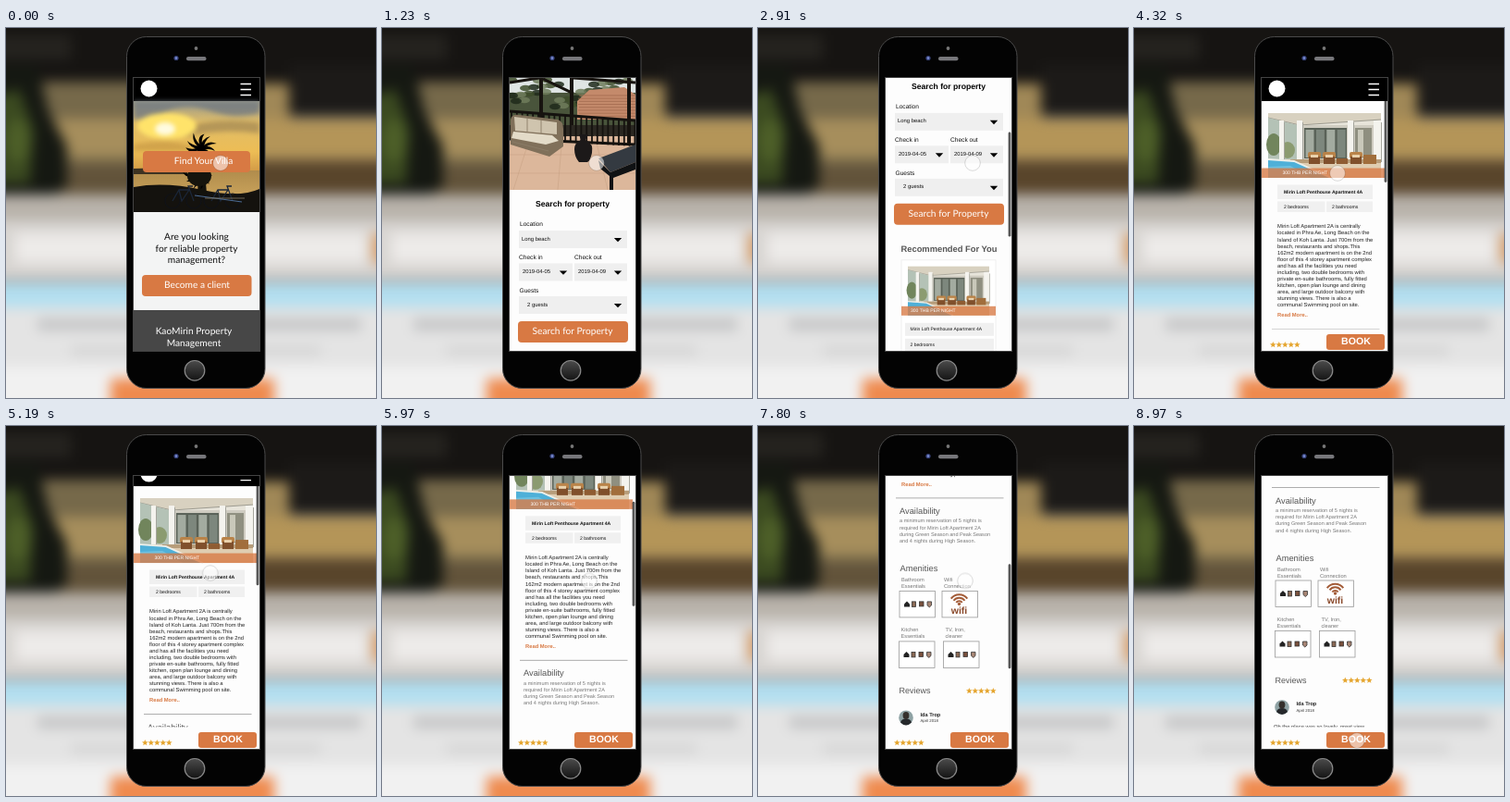
Write an HTML page that moves like this. It is 400x400 px and loops after 9000 ms.

```html
<!DOCTYPE html>
<html lang="en">
<head>
<meta charset="utf-8">
<title>Villa booking on a phone</title>
<style>
  @property --y { syntax: "<number>"; inherits: true; initial-value: 0; }

  html, body { margin: 0; width: 100%; height: 100%; overflow: hidden; background: #222; }
  svg { display: block; width: 100vw; height: 100vh; }
  text { font-family: "Liberation Sans", Arial, sans-serif; text-rendering: geometricPrecision; white-space: pre; }
  filter { color-interpolation-filters: sRGB; }
  .lato { font-family: Lato, sans-serif; }
  .b { font-weight: 700; }
  .mid { text-anchor: middle; }

  .home, .search, .villa, .bar, .touch { animation: 9s linear infinite; }
  .home { animation-name: home; animation-timing-function: step-end; }
  .search { animation-name: search, searchScroll; animation-timing-function: step-end, linear; }
  .villa { animation-name: villa, villaScroll; animation-timing-function: step-end, linear; }
  .page { transform: translateY(calc(var(--y) * -1px)); }
  .thumb { transform: translateY(calc(var(--y) * .385px)); }
  .search .bar { animation-name: searchBar; }
  .villa .bar { animation-name: villaBar; }
  .touch { animation-name: touch; }

  @keyframes home { 0% { visibility: visible } 5.56%, 100% { visibility: hidden } }
  @keyframes search { 0% { visibility: hidden } 5.56% { visibility: visible } 43.33%, 100% { visibility: hidden } }
  @keyframes villa { 0% { visibility: hidden } 43.33%, 100% { visibility: visible } }

  @keyframes searchScroll {
    0%, 10.7% { --y: 0 }
    13.67% { --y: 25 }
    32.33% { --y: 152 }
    40.2%, 100% { --y: 255 }
  }
  @keyframes villaScroll {
    0%, 55.6% { --y: 0 }
    66.33% { --y: 72 }
    77.33% { --y: 182 }
    88.3%, 100% { --y: 259 }
  }
  @keyframes searchBar { 0%, 14% { opacity: 0 } 16%, 41% { opacity: 1 } 43%, 100% { opacity: 0 } }
  @keyframes villaBar { 0%, 90% { opacity: 1 } 93%, 100% { opacity: 0 } }
  @keyframes touch {
    0%, 34% { transform: translate(232px, 146px) }
    41%, 55.6% { transform: translate(220px, 157px) }
    66.33%, 88% { transform: translate(224px, 167.5px) }
    95%, 100% { transform: translate(241px, 340px) }
  }
</style>
</head>
<body>
<svg id="stage" viewBox="0 0 400 400" preserveAspectRatio="none"></svg>
<script>
const ORANGE = '#d87943', GOLD = '#e5a52e';

const rect = (x, y, w, h, fill, more = '') =>
  `<rect x="${x}" y="${y}" width="${w}" height="${h}" fill="${fill}" ${more}/>`;
const oval = (x, y, rx, ry, fill, more = '') =>
  `<ellipse cx="${x}" cy="${y}" rx="${rx}" ry="${ry}" fill="${fill}" ${more}/>`;
const path = (d, fill, more = '') => `<path d="${d}" fill="${fill}" ${more}/>`;
const line = (d, stroke, width = 1) => path(d, 'none', `stroke="${stroke}" stroke-width="${width}"`);
const text = (x, y, size, str, fill = '#111', cls = '') =>
  `<text x="${x}" y="${y}" font-size="${size}" fill="${fill}" class="${cls}">${str}</text>`;
const lines = (x, y, size, gap, rows, fill, cls) =>
  rows.map((row, i) => text(x, y + i * gap, size, row, fill, cls)).join('');
const group = (cls, body) => `<g class="${cls}">${body}</g>`;
const at = (x, y, body, scale = '1') => `<g transform="translate(${x} ${y}) scale(${scale})">${body}</g>`;
const times = (n, fn) => Array.from({ length: n }, (_, i) => fn(i)).join('');
const gradient = (id, stops) => `<linearGradient id="${id}" x2="0" y2="1">` +
  stops.map(([at, color]) => `<stop offset="${at}" stop-color="${color}"/>`).join('') + '</linearGradient>';

function stars(x, y) {
  const points = Array.from({ length: 10 }, (_, i) => {
    const a = i * Math.PI / 5, r = i % 2 ? 1.5 : 3.5;
    return `${(r * Math.sin(a)).toFixed(2)},${(-r * Math.cos(a)).toFixed(2)}`;
  }).join(' ');
  return times(5, i => at(x + i * 6.5, y, `<polygon points="${points}" fill="${GOLD}"/>`));
}

const header = rect(138, 54, 136, 25, '#000') +
  oval(154.5, 65.5, 9, 9, '#fff') +
  line('M253.5 60.5H265M253.5 66.5H265M253.5 72.5H265', '#fff', 1.3);

const button = (x, y, w, label, cx) =>
  rect(x, y, w, 23, ORANGE, 'rx="4"') + text(cx, y + 14.4, 10.2, label, '#fff', 'lato mid');

const arrow = (x, y) => path(`M${x - 4.2} ${y}h8.4l-4.2 4.4z`, '#000');

const field = (x, y, w, value, dx = 3) =>
  rect(x, y, w, 19, '#efefef') + text(x + dx, y + 10.6, 5.9, value) + arrow(x + w - 10, y + 8);

const bar = group('bar', group('thumb', rect(270.6, 54, 2.8, 113, '#000', 'rx="1.4" opacity=".65"')));

function backdrop() {
  const soft = [
    rect(-30, -30, 460, 95, '#161412'),
    rect(-30, 8, 100, 26, '#25231f'),
    rect(-30, 58, 200, 125, '#76694a'),
    rect(40, 98, 100, 42, '#a68e5c'),
    rect(40, 148, 110, 32, '#62533a'),
    path('M-30 40H34L46 90L66 128V172L40 186H-30z', '#151812'),
    path('M-30 80L14 66L30 110L26 168H-30z', '#3b4a20'),
    oval(13, 122, 13, 24, '#4d5f28'),
    rect(260, 60, 48, 50, '#a08857'),
    rect(306, 40, 130, 55, '#1c1a18'),
    rect(260, 98, 170, 44, '#b49558'),
    rect(260, 143, 170, 36, '#59452b'),
    rect(-30, 180, 460, 32, '#b8b2aa'),
    rect(-30, 208, 460, 64, '#d8d5d2'),
    rect(10, 222, 380, 32, '#edebe9'),
    rect(396, 222, 30, 32, '#d9a06d'),
    rect(-30, 275, 460, 27, '#b3dff0'),
    rect(-30, 302, 460, 130, '#e4e4e4'),
    rect(34, 314, 350, 13, '#c4c5c6'),
    rect(70, 344, 270, 10, '#d4d4d4'),
    rect(-30, 366, 460, 66, '#f1f1f1'),
    rect(113, 379, 177, 50, '#ef8a4e')
  ].join('');
  return rect(0, 0, 400, 400, '#777') + `<g filter="url(#blur)">${soft}</g>`;
}

function sunset() {
  const frond = i => `<path d="M0 0Q${9 + i % 3 * 2} -5 ${15 + i % 4} ${3 + i % 3}Q8 -1 0 3z" transform="rotate(${i * 33})"/>`;
  const bike = x => [x, x + 23].map(cx => `<circle cx="${cx}" cy="187" r="8" fill="none" stroke="#101218" stroke-width="1.2"/>`).join('') +
    line(`M${x} 187L${x + 7} 175H${x + 18}L${x + 10} 187L${x + 7} 175M${x + 23} 187L${x + 17} 171H${x + 22}`, '#1b2638', 1.3);
  return rect(138, 79, 136, 78, 'url(#sky)') +
    `<g filter="url(#haze)">` +
    path('M138 79H274V92Q248 99 222 90T176 89T138 99z', '#6f7780', 'opacity=".75"') +
    path('M192 108Q224 96 274 102V114Q230 108 194 118z', '#a18653', 'opacity=".7"') +
    path('M138 126Q176 118 200 128V133H138z', '#b78a3f', 'opacity=".5"') +
    oval(174, 106, 32, 14, '#ffe36a') + oval(172, 109, 11, 7, '#fffbe0') + '</g>' +
    rect(138, 154, 136, 28, 'url(#sea)') +
    path('M138 152L172 151L196 154V158H138z', '#3d3322') +
    path('M138 172Q172 166 212 175T274 174V199H138z', '#14120e') +
    path('M207 180L209 140H214L217 180z', '#13120c') +
    at(211, 130, times(11, frond)) + at(208, 157, times(11, frond)) + oval(209, 160, 13, 11, '#15140d') +
    bike(180) + bike(222) +
    line('M204 181L255 188', '#4b6a92', 1.1) + line('M215 184H258', '#867b69', .8);
}

function terrace() {
  const leaf = i => oval(140 + i * 37 % 134, 81 + i * 13 % 30, 6, 3.2, ['#3e4d2c', '#6f7c5c', '#1f2a1b'][i % 3], 'opacity=".85"');
  return rect(138, 79, 136, 121, '#dfe5e4') + rect(138, 95, 136, 38, '#49543b') + times(38, leaf) +
    path('M211 104L224 92L262 89L274 97V124H211z', '#c48a6b') +
    times(8, i => line(`M${213 - i % 2} ${98 + i * 3.2}H274`, '#9c654a', .7)) +
    rect(138, 130, 136, 16, '#2b2822') +
    path('M138 147L200 142H274V200H138z', '#dcb79b') +
    line('M138 162H274M138 182H274M160 143L142 200M195 141L190 200M230 141L244 200', '#c59e80', .5) +
    line('M138 115L274 125M138 145L274 151', '#15120f', 3) +
    times(24, i => line(`M${140 + i * 5.8} ${116 + i * .35}v29`, '#15120f', 1.8)) +
    line('M172 79V126M205 79V130M267 79V150', '#17130f', 4) +
    line('M138 84L170 79M174 80L207 96M207 79L274 84', '#17130f', 3) +
    path('M139 124Q140 118 148 119L190 124Q196 126 196 134V153L181 164L139 151z', '#80705a') +
    path('M143 121L189 127V140L144 136z', '#cfc4ae') +
    path('M142 137L184 141L191 147L177 151L140 144z', '#e3dbc8') +
    line('M157 123V137M172 125V139M141 148L180 158', '#8c7d68', .9) +
    path('M213 140H223L220 146Q229 150 227 160Q225 169 222 170H213Q208 164 208 156Q208 149 215 146z', '#1c1919') +
    path('M234 166L274 151V170L247 181z', '#343a41') +
    path('M234 168L247 181L274 170V178L250 187V200H246V185L236 177z', '#101214');
}

// Drawn in a 122 by 70 box.
function house() {
  const chair = x => rect(x, 42, 14, 7, '#b98349', 'rx="2"') + rect(x + 1, 47, 12, 8, '#80502c') + rect(x + 3, 45, 8, 3, '#ead2ad');
  const pillar = (x, w) => rect(x, 8, w, 46, '#f4f3ee') + rect(x + w, 10, 1, 43, '#a5a59d');
  return rect(0, 0, 122, 70, '#e7e4da') +
    path('M0 0H122V7L34 13L0 5z', '#d8d1c0') + line('M0 5L34 13L122 7', '#8c8b80', .8) +
    path('M0 5L32 13V50H0z', '#b4c2b6') + oval(6, 34, 8, 12, '#71855c') + oval(21, 40, 8, 9, '#8b9b70') +
    rect(32, 13, 90, 38, '#cfccc1') + rect(39, 16, 46, 33, '#596157') +
    times(4, i => rect(40.5 + i * 11.4, 18, 9, 30, i % 2 ? '#7d877d' : '#a3aba0')) +
    rect(94, 16, 18, 32, '#8f8f80') + rect(97, 18, 6, 29, '#c9c8ba') +
    pillar(12, 5) + pillar(31, 6) + pillar(86, 6) + pillar(114, 8) +
    path('M0 50H122V70H0z', '#dfcdb1') + rect(24, 50, 98, 4, '#b79d7a') +
    path('M0 50L28 52L68 70H0z', '#4fb0d8') + path('M0 58L24 57L46 70H0z', '#84cde6', 'opacity=".6"') +
    line('M0 50L28 52L68 70', '#eef1ec', 1.8) +
    chair(43) + chair(59) + chair(88) + rect(74, 49, 12, 6, '#8f5c32') + rect(103, 45, 14, 10, '#a16e3c');
}

function homePage() {
  return rect(138, 54, 136, 295, '#f3f4f4') + header + sunset() +
    button(148, 133, 116, 'Find Your Villa', 213.5) +
    lines(206, 228.8, 10.2, 12.8, ['Are you looking', 'for reliable property', 'management?'], '#111', 'lato mid') +
    button(147, 267, 118.5, 'Become a client', 206.5) +
    rect(138, 305, 136, 44, '#474747') +
    lines(203, 330.8, 10.2, 12.8, ['KaoMirin Property', 'Management'], '#fff', 'lato mid');
}

function searchPage() {
  return header + terrace() +
    text(206, 218, 8.62, 'Search for property', '#000', 'b mid') +
    text(149, 239.5, 6.6, 'Location') + field(148, 244, 117, 'Long beach') +
    text(148, 275.3, 6.6, 'Check in') + text(208, 275.3, 6.6, 'Check out') +
    field(148, 279.5, 58, '2019-04-05', 4) + field(208, 279.5, 57, '2019-04-09', 4) +
    text(148.5, 310.8, 6.6, 'Guests') + field(148, 315, 117, '2 guests', 9) +
    button(147, 342, 119, 'Search for Property', 206) +
    text(206.5, 394, 9.36, 'Recommended For You', '#555', 'b mid') +
    rect(155, 403, 102, 122, '#fff', 'stroke="#f0f0f0"') +
    at(162, 410, house(), '.721 .757') +
    rect(155, 453, 102, 10, ORANGE, 'opacity=".78"') + text(165, 459.5, 5.05, '300 THB PER NIGHT', '#fff') +
    ['Mirin Loft Penthouse Apartment 4A', '2 bedrooms', '2 bathrooms'].map((s, i) =>
      rect(159, 471 + i * 17, 96, 14, '#f0f0f0') + text(164.5, 479 + i * 17, 5, s)).join('');
}

function amenity(x, y, label, body) {
  return lines(x + 2, y - 10.4, 5.7, 7, label, '#777') +
    rect(x, y, 38.5, 28.5, '#fff', 'stroke="#999" stroke-width=".8"') + at(x, y, body);
}

const tinyIcons = path('M5 14l3-3l3 3v3H5z', '#222') +
  rect(13.5, 11.5, 4, 5.5, '#8b6a55', 'stroke="#333" stroke-width=".8"') +
  rect(21.5, 11.5, 4.5, 5, '#79503c', 'stroke="#333" stroke-width=".8"') +
  path('M30 11.5h4.5v4l-2.2 2l-2.3-2z', '#a88675', 'stroke="#333" stroke-width=".8"');

const wifi = [4, 7.5, 11].map(r => path(`M${18.5 - r * .8} ${15 - r * .62}A${r} ${r} 0 0 1 ${18.5 + r * .8} ${15 - r * .62}`,
  'none', 'stroke="#a35c38" stroke-width="2"')).join('') +
  oval(18.5, 14, 1.7, 1.7, '#a35c38') + text(18.5, 25, 10.5, 'wifi', '#8a4a2c', 'b mid');

const description = [
  'Mirin Loft Apartment 2A is centrally', 'located in Phra Ae, Long Beach on the',
  'Island of Koh Lanta. Just 700m from the', 'beach, restaurants and shops.This',
  '162m2 modern apartment is on the 2nd', 'floor of this 4 storey apartment complex',
  'and has all the facilities you need', 'including, two double bedrooms with',
  'private en-suite bathrooms, fully fitted', 'kitchen, open plan lounge and dining',
  'area, and large outdoor balcony with', 'stunning views. There is also a',
  'communal Swimming pool on site.'
];

const terms = [
  'a minimum reservation of 5 nights is', 'required for Mirin Loft Apartment 2A',
  'during Green Season and Peak Season', 'and 4 nights during High Season.'
];

function villaPage() {
  return header + at(145, 92, house()) +
    rect(138, 151.5, 133, 10.5, ORANGE, 'opacity=".78"') + text(160.5, 158.4, 5.05, '300 THB PER NIGHT', '#fff') +
    rect(155, 169.5, 103, 15.5, '#f0f0f0') + text(162, 179.3, 5.1, 'Mirin Loft Penthouse Apartment 4A', '#111', 'b') +
    rect(155, 187.5, 51.5, 11.5, '#f0f0f0') + text(162, 195, 5.1, '2 bedrooms') +
    rect(208, 187.5, 50, 11.5, '#f0f0f0') + text(214, 195, 5.1, '2 bathrooms') +
    lines(155, 216.4, 5.83, 7.08, description, '#222') +
    text(155, 312.2, 5.8, 'Read More..', ORANGE, 'b') +
    line('M149 325.5H265.5', '#999', .8) +
    text(153, 342.5, 9.3, 'Availability', '#555') + lines(153, 352, 5.55, 7.2, terms, '#777') +
    text(153.5, 405, 9.3, 'Amenities', '#555') +
    amenity(153, 426, ['Bathroom', 'Essentials'], tinyIcons) +
    amenity(199, 426, ['Wifi', 'Connection'], wifi) +
    amenity(152.5, 480.5, ['Kitchen', 'Essentials'], tinyIcons) +
    amenity(200.5, 480.5, ['TV, Iron,', 'cleaner'], tinyIcons) +
    text(152.5, 536.8, 9, 'Reviews', '#555') + stars(228.3, 534) +
    oval(160, 563, 7.8, 7.8, '#8fa3a5') + path('M154 568Q155 564 160 564T166 568Q160 574 154 568z', '#25282b') + oval(160, 560.5, 3.4, 4, '#35302c') +
    text(175.5, 561.3, 5.6, 'Ida Trop', '#222', 'b') + text(175.5, 568, 4.3, 'April 2018', '#333') +
    text(151, 585.5, 5.8, 'Oh the place was so lovely, great view', '#333');
}

const footer = rect(138, 325.5, 136, 24, '#fdfdfd') + stars(150.3, 342.5) +
  rect(208, 331, 63, 17, ORANGE, 'rx="3"') + text(240, 342.2, 10.6, 'BOOK', '#fff', 'b mid');

const screen = (cls, body, over = '') =>
  group(cls, rect(138, 54, 136, 295, '#fdfdfd') + group('page', body) + over + bar);

const phone = rect(130.5, 9.5, 149.5, 380, '#030303', 'rx="21" stroke="#4a4a4a" stroke-width="1"') +
  oval(205.5, 22, 1.9, 1.9, '#777') +
  oval(184, 32.5, 2.6, 2.6, '#39447c') + oval(184, 32.5, 1.2, 1.2, '#7f91d8') +
  rect(195, 31, 21.5, 4.2, '#77777b', 'rx="2"') +
  oval(204, 370.3, 10.8, 10.8, 'url(#key)', 'stroke="#8a8a8a" stroke-width="1.2"') +
  rect(137.5, 53.5, 137, 296, '#000', 'stroke="#444" stroke-width="1"');

const defs = `<defs>
  <filter id="blur" x="-20%" y="-20%" width="140%" height="140%"><feGaussianBlur stdDeviation="7"/></filter>
  <filter id="haze"><feGaussianBlur stdDeviation="2.5"/></filter>
  <clipPath id="glass">${rect(138, 54, 136, 295, '#000')}</clipPath>` +
  gradient('sky', [[0, '#9a9b8c'], [.3, '#e0bd68'], [.7, '#edbd55'], [1, '#cf9745']]) +
  gradient('sea', [[0, '#b08c4c'], [1, '#c9a25a']]) +
  gradient('key', [[0, '#4b4b4b'], [1, '#141414']]) + '</defs>';

document.getElementById('stage').innerHTML = defs + backdrop() + phone +
  `<g clip-path="url(#glass)">` +
  group('home', homePage()) +
  screen('search', searchPage()) +
  screen('villa', villaPage(), footer) +
  group('touch', oval(0, 0, 8.3, 8.3, '#fff', 'fill-opacity=".55" stroke="#000" stroke-opacity=".16" stroke-width=".9"')) +
  '</g>';
</script>
</body>
</html>
```
